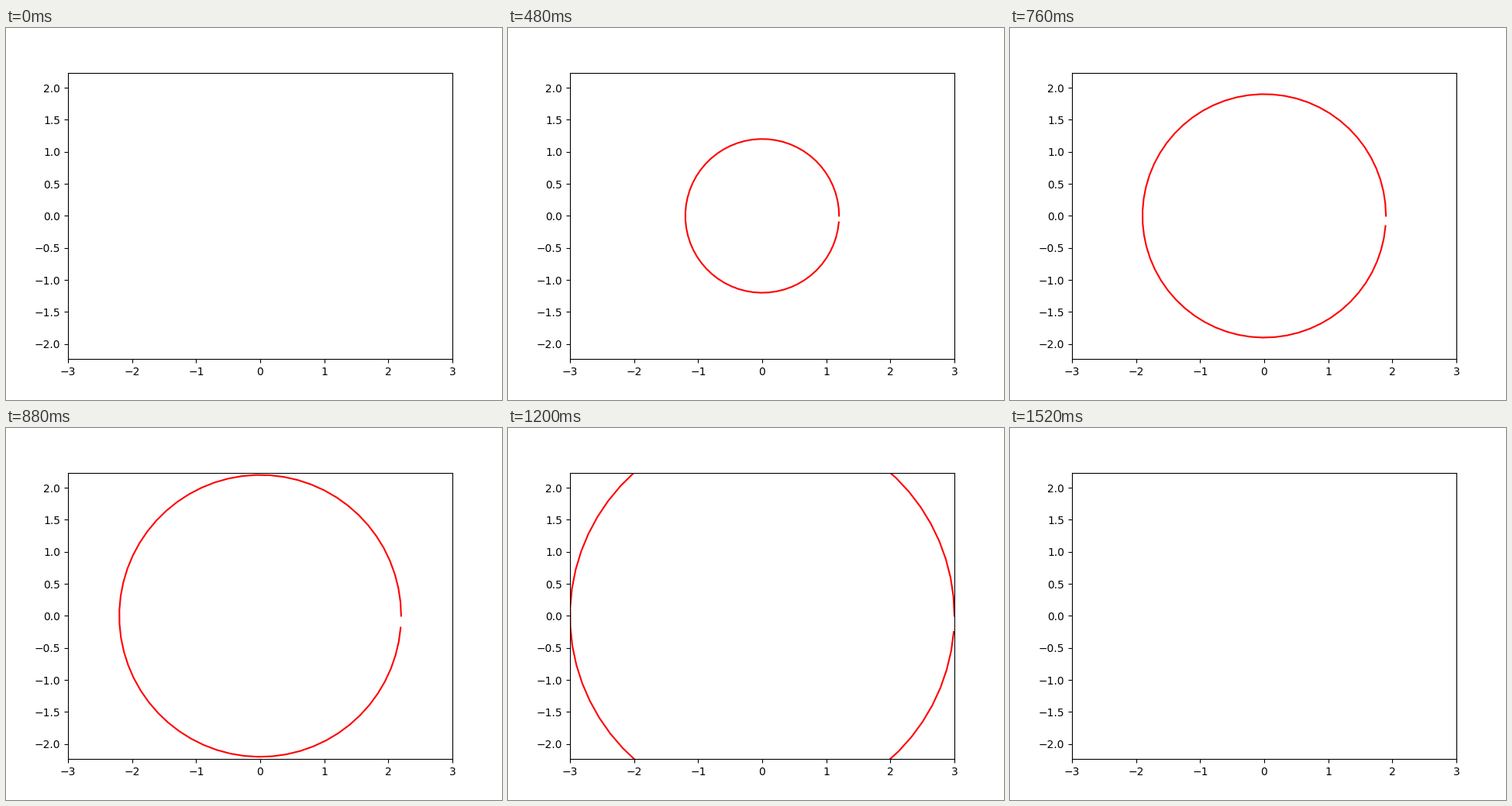
Animation, 640 px wide and 480 px high, one loop 4.53 s. Source, as a matplotlib script:

```python
import numpy as np
import matplotlib.pyplot as plt
from matplotlib.animation import FuncAnimation

INTERVAL = 10            # ms per animation frame
LOOP = 4530              # ms per loop, including the final pause
STEP_MS = 20             # the circle grows once per step
GROWTH = 0.05            # radius gained per step
HALF_WIDTH = 3

fig, ax = plt.subplots(figsize=(6.4, 4.8), dpi=100)

# Same scale on both axes
box = ax.get_position()
half_height = HALF_WIDTH * (box.height * 4.8) / (box.width * 6.4)
ax.set_xlim(-HALF_WIDTH, HALF_WIDTH)
ax.set_ylim(-half_height, half_height)

# The step does not divide a full turn, which leaves a small gap
theta = np.arange(0, 2 * np.pi, 0.1)
unit_x, unit_y = np.cos(theta), np.sin(theta)
circle, = ax.plot([], [], color="red", linewidth=1.5)


def update(frame):
    radius = GROWTH * (frame * INTERVAL // STEP_MS)
    circle.set_data(radius * unit_x, radius * unit_y)
    circle.set_visible(0 < radius < 3.78)
    return circle,


anim = FuncAnimation(fig, update, frames=LOOP // INTERVAL, interval=INTERVAL,
                     repeat=True, repeat_delay=0)
plt.show()
```
